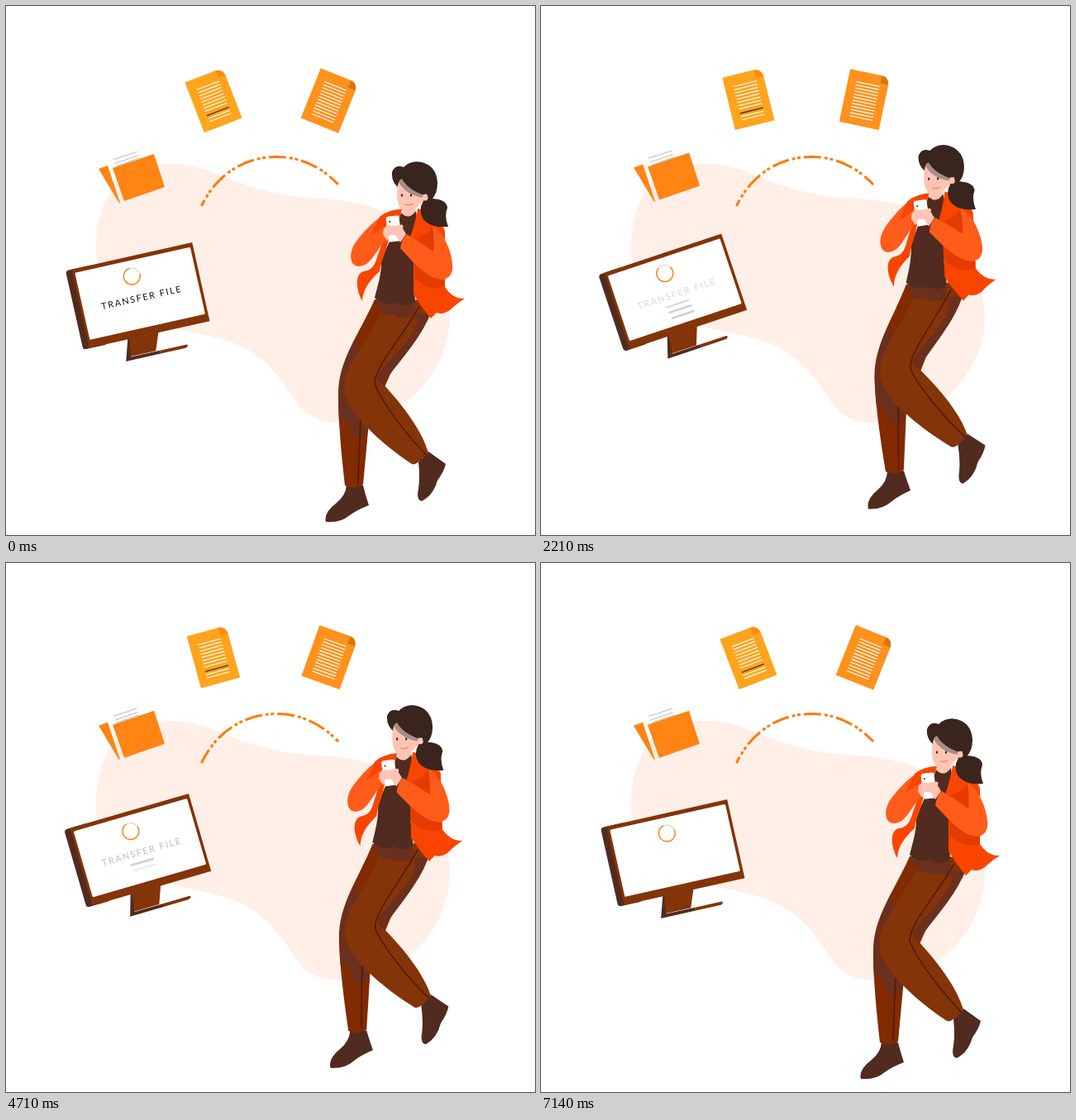
Recreate the animation shown at these times as an HTML page. Size 640 px wide and 640 px high, loop 7.21 s.

```html
<!DOCTYPE html>
<html lang="en">
<head>
<meta charset="utf-8">
<title>Transfer file</title>
<style>
  html, body { margin: 0; width: 100%; height: 100%; overflow: hidden; background: #fff; }
  svg { display: block; width: 100%; height: 100%; }
  .shirt { fill: #512b1f; }
  .brown { fill: #833408; }
  .rust { fill: #822a00; }
  .shade { fill: #6b2f1d; }
  .sleeve { fill: #ff5c1c; }
  .jacket { fill: #f94500; }
  .crease { fill: #e33b00; }
  .skin { fill: #ffc4b3; }
  .hair { fill: #39251d; }
  .line { fill: none; stroke-linecap: round; }
  .seam { stroke: #541900; stroke-width: 1.5; }
  .rules { stroke: #fff; stroke-width: 1.2; }
  text { font: 10.8px Lato, sans-serif; letter-spacing: 1.75px; fill: #111; }
</style>
</head>
<body>
<svg viewBox="0 0 640 640">
  <path fill="#ffefe7" d="M109 300C107 263 119 221 146 203C165 190 207 187 239 197C270 209 312 228 365 232C420 234 468 244 503 278C525 302 537 345 537 380C535 420 513 458 482 480C456 496 424 504 396 504C374 503 360 493 349 476C335 455 317 427 285 412C258 399 222 395 185 385C144 370 112 340 109 300Z"/>

  <path id="arc" fill="none" stroke="#ff7a08" stroke-width="3" stroke-dasharray="21 4 4 2.5 4 4" d="M236.5 242C253 207 285 183 326 182.500C354 182 380 193 402 216"/>

  <g id="folder">
    <path class="line" stroke="#b9b9bd" d="M130.500 185.500L158 176.500M132 190.500L159 181M134 193.500L161 184"/>
    <path fill="#ff8413" d="M129 196L179 179L192 219L143 236ZM112 197L123 193L138 238L136.500 238Z"/>
  </g>

  <g id="page1">
    <path fill="#ffa41c" d="M-24.500-32.500H15Q23-32 24.500-23V32.500H-24.500Z"/>
    <path fill="#ff8a12" d="M15-32.500Q23-32 24.500-23H15Z"/>
    <g class="rules"></g>
    <path stroke="#512b1f" stroke-width="1.3" d="M-14 14.500H14.500"/>
  </g>

  <g id="page2">
    <path fill="#ff911d" d="M-24.500-32.500H15Q23-32 24.500-23V32.500H-24.500Z"/>
    <path fill="#d97500" d="M15-32.500Q23-32 24.500-23H15Z"/>
    <g class="rules"></g>
  </g>

  <g id="monitor">
    <path class="shirt" d="M-23 48L-31 74H12V70H-24L-18 48Z"/>
    <path class="brown" d="M-21 48H15L7 69.500H-24ZM12 70H44Q47 70 46 72Q45 74 42 74H12Z"/>
    <rect class="shirt" x="-78.500" y="-49" width="30" height="98" rx="4"/>
    <path class="brown" d="M-71-49H78.500V48.500H-71Z"/>
    <rect fill="#fff" x="-68" y="-44" width="143" height="83" rx="1.500"/>
    <g class="line" stroke-width="1.400" transform="translate(-1.600 -25)">
      <circle r="10" stroke="#d8d0c8" stroke-width="1"/>
      <circle id="spinner" r="10" stroke="#ff8413" stroke-dasharray="46 17"/>
    </g>
    <text id="label" x="-45.600" y="6.500">TRANSFER FILE</text>
    <g fill="#cfcfcf" id="bars">
      <rect x="-13" y="13.500" width="29" height="2.500"/>
      <rect x="-12" y="20.500" width="29" height="2.500"/>
      <rect x="-11" y="28" width="29" height="2.500"/>
    </g>
  </g>

  <g id="person">
    <!-- legs and shoes -->
    <path class="shirt" d="M412 580L432 580Q435 592 439 604Q424 610 416 616Q404 626 387 624Q384 613 400 601Q411 592 412 580ZM511 539L532 554Q530 563 522 574Q517 592 503 599Q496 598 499 584Q501 570 499 552Z"/>
    <path class="rust" d="M446 355C427 398 402 428 402 470C402 505 406 545 410 580Q420 586 432 579L439 504L485 400L480 360Z"/>
    <path class="shade" d="M423 402C402 440 401 468 403 501Q413 497 415 508Q414 518 421 520Q427 533 438 512L440 470Z"/>
    <path class="line seam" d="M429 502Q427 540 426 578"/>
    <path class="brown" d="M455 366C441 405 409 430 409 462C409 490 457 532 491 554Q496 557 511 541C503 512 478 481 456 457C475 430 501 404 513 373L498 355Z"/>
    <path class="shade" d="M446 355L456 374Q465 371 472 376Q485 379 497 373L513 373C501 404 475 430 456 457Q445 452 452 443C464 429 484 409 491 397Q500 383 495 372L494 352Z"/>
    <path class="line seam" d="M500 364C473 409 446 437 446 457C452 474 479 513 508 543"/>

    <!-- torso and jacket -->
    <path class="skin" d="M481 240H495L496 254Q487 261 479 254Z"/>
    <path class="shirt" d="M478 250Q487 260 496 248Q503 300 493 328L495 357Q485 367 472 359Q456 363 446 353C450 337 454 326 454 309C462 286 471 273 478 250Z"/>
    <path class="jacket" d="M465 276L458 300Q453 312 452 321C440 332 432 342 431 357C421 338 424 323 433 321Q443 320 447 310L456 284ZM498 245C515 250 527 262 531 272L531 340Q541 355 555 354Q544 361 537 368Q528 374 521 371Q518 374 514 378Q504 366 493 349L493 300L487 285Q495 265 498 245Z"/>
    <path class="crease" d="M516 266L519 299L496 281Q512 276 516 266ZM494 309Q515 330 531 332L530 340Q512 346 494 329Z"/>
    <path class="sleeve" d="M516 266C532 275 542 305 540 319C538 331 528 334 514 327C500 319 488 305 477 293Q479 281 485 276L517 297Q519 282 516 266ZM479 246C459 247 441 263 426 282C413 297 415 316 428 315C442 313 445 299 459 284L460 266Q470 263 478 251Z"/>
    <path class="jacket" d="M479 246Q463 246 452 255L441 278L462 264L475 258Z"/>

    <!-- phone and hands -->
    <rect fill="#fff" x="461" y="254" width="16" height="31" rx="2.500" transform="rotate(-6 469 269)"/>
    <circle class="hair" cx="464" cy="261" r="1"/>
    <path class="skin" d="M457 269Q462 264 467 266L476 265Q482 263 480 269L484 276L477 286L471 277L464 277L461 284L456 276Z"/>

    <g id="head">
      <path class="skin" d="M475 211C471 228 473 244 482 249Q493 250 502 238L510 235Q513 227 505 228L490 205Z"/>
      <path class="hair" d="M474 219Q466 212 467 201Q471 191 481 195Q490 186 503 189Q521 194 522 214Q522 226 516 233Q533 234 534 244Q530 255 535 267Q514 269 505 258Q498 247 505 236L510 228Q506 227 503 229Q485 224 479 210Q474 212 474 219Z"/>
      <path fill="#a58f88" d="M475 213Q476 210 479 209Q486 222 506 229L504 232Q483 228 475 213Z"/>
      <circle class="skin" cx="507" cy="232" r="3.500"/>
      <g class="hair"><ellipse cx="479" cy="229" rx="1.200" ry="1.700"/><ellipse cx="490" cy="229" rx="1.200" ry="1.700"/></g>
      <path class="line" stroke="#e8755f" d="M483 240Q488 242 492 239"/>
    </g>
  </g>
</svg>
<script>
const LOOP = 7210;
const $ = id => document.getElementById(id);
const clamp = v => Math.max(0, Math.min(1, v));
const ease = u => (1 - Math.cos(Math.PI * clamp(u))) / 2;

// Eased movement from 0 through [time, value] keys.
const swing = (...keys) => t => {
  let [time, value] = [0, 0];
  for (const [nextTime, nextValue] of keys) {
    value += (nextValue - value) * ease((t - time) / (nextTime - time));
    if (t < nextTime) break;
    time = nextTime;
  }
  return value;
};

const END = 7140;
const sway = swing([1500, -1], [2000, -1], [3300, 0.9], [5400, -1], [END, 0]);
const bodyY = swing([1200, -40], [2480, -17], [3600, -35], [4780, -15.5], [5700, -43], [END, 0]);
const headTurn = swing([1000, -7], [2600, 3], [4300, 3], [5800, -6], [END, 0]);
const monitorY = swing([1200, -22.5], [2450, -2.5], [3600, -38], [4800, -2.5], [6000, -45], [END, 0]);
const page1Turn = swing([700, -0.8], [2200, 7.2], [3900, 3.5], [5400, 7.4], [END, 0]);
const page2Turn = swing([2700, -10.8], [4600, -1.8], [5500, -11.3], [END, 0]);
const labelFade = swing([1600, -0.85], [4700, -0.72], [5500, -0.12], [END, -1]);

// The loading bars come and go one after another, twice per loop.
const rounds = [{ from: 60, step: 500, until: 2150 }, { from: 3840, step: 800, until: 6200 }];
const barFade = (t, i) => Math.max(...rounds.map(({ from, step, until }) =>
  Math.min(clamp((t - from - step * i) / 200), clamp((until + 330 * i + 250 - t) / 250))));

function addRules(page, count, gap, top = -19) {
  for (let i = 0; i < count; i++)
    document.querySelector(`#${page} .rules`).innerHTML += `<path d="M-14 ${top + i * gap}h28.5"/>`;
}
addRules("page1", 8, 4);
addRules("page1", 2, 4, 18.5);
addRules("page2", 12, 3.8);

const place = (id, transform) => $(id).setAttribute("transform", transform);

function draw(now) {
  const t = now % LOOP;
  const lift = (1 - Math.cos(t / LOOP * 6 * Math.PI)) / 2;
  const fileY = -23 * lift;

  place("folder", `translate(${3 * lift} ${fileY})`);
  place("page1", `translate(${251 - 1.5 * lift} ${114 + fileY}) rotate(${page1Turn(t) - 21})`);
  place("page2", `translate(391.5 ${114.5 + fileY}) rotate(${page2Turn(t) + 21.8})`);
  place("monitor", `translate(159.3 ${351 + monitorY(t)}) rotate(${6.7 * sway(t) - 12.6})`);
  place("person", `translate(0 ${bodyY(t)}) rotate(${3.2 * sway(t)} 470 440)`);
  place("head", `rotate(${headTurn(t)} 488 250)`);
  place("spinner", `rotate(${t / LOOP * 1080})`);

  $("arc").setAttribute("stroke-dashoffset", 13 + 39.5 * ease((t - 2200) / 3800));
  $("label").setAttribute("opacity", 1 + labelFade(t));
  [...$("bars").children].forEach((bar, i) => bar.setAttribute("opacity", barFade(t, i)));
  requestAnimationFrame(draw);
}
draw(0);
</script>
</body>
</html>
```
